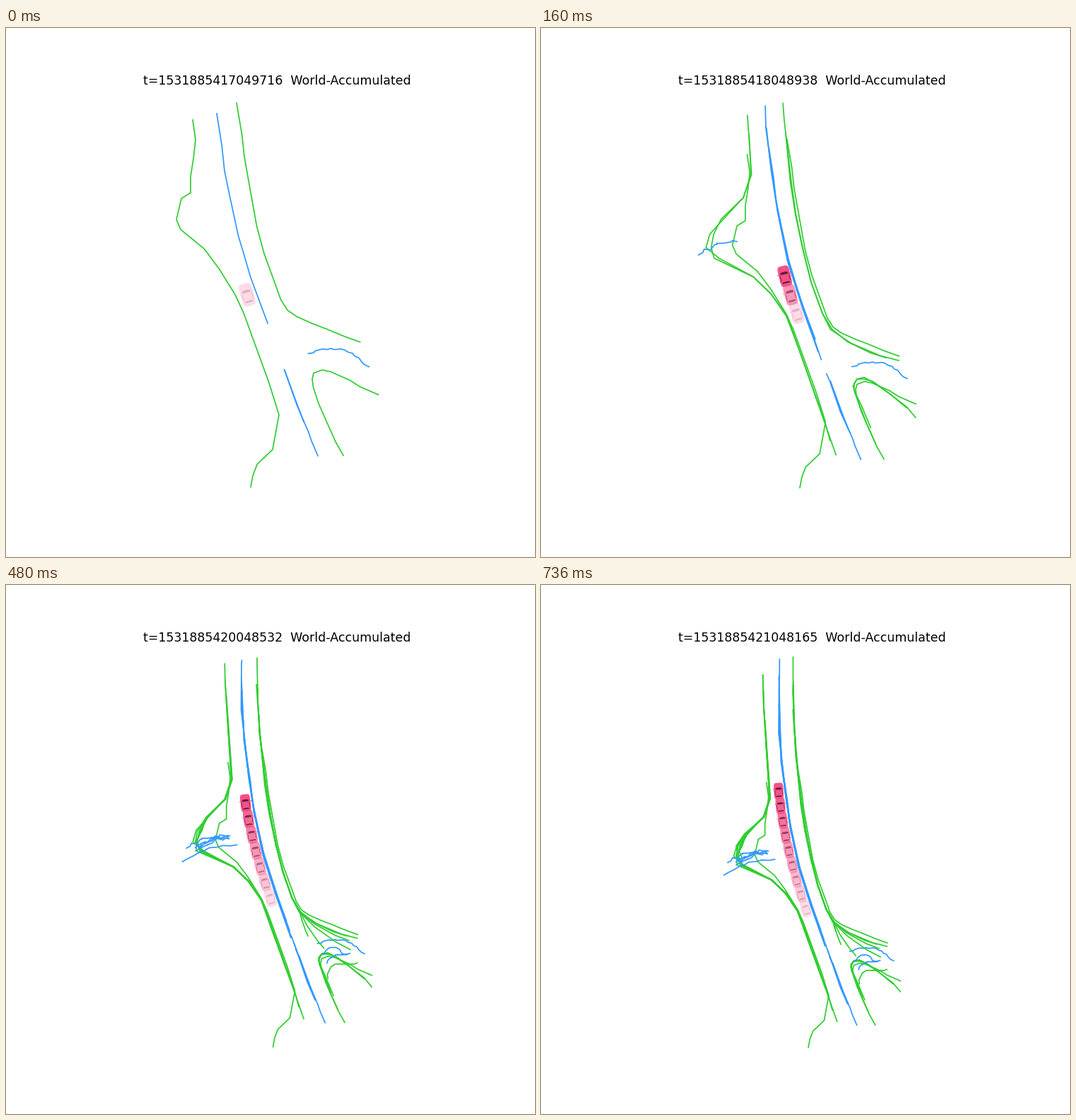
Write a matplotlib script that moves like this. It is 748 px wide and 748 px high and loops after 800 ms.

```python
import numpy as np
import matplotlib.pyplot as plt
from matplotlib.animation import FuncAnimation

SIZE = 748
STEPS = 5
GREEN, BLUE = "#32cd32", "#3399ff"
PINK, GLASS = "#fa4f87", "#5c2340"
STAMPS = [1531885417049716, 1531885418048938, 1531885419048128,
          1531885420048532, 1531885421048165]

# The view zooms out as the map grows: one fixed point and a scale per step.
ANCHOR = np.array([(346, 649), (366, 650), (367.5, 651.5), (377.5, 653), (378, 654)])
SCALE = [1, 0.9075, 0.832, 0.7745, 0.7215]
LAST = STEPS - 1

rng = np.random.default_rng(4)
lines = []


def change_view(points, old, new):
    return ANCHOR[new] + SCALE[new] / SCALE[old] * (points - ANCHOR[old])


def line(step, color, points, view=LAST):
    """Add a polyline, given in one view, that appears at a step."""
    lines.append((step, color, change_view(np.array(points, float), view, LAST)))


def scan(step, color, lane, top, bottom, bulge=0, tail=()):
    """Add one noisy sighting of a lane between two heights."""
    x, y = np.array(lane, float).T
    ys = np.array([top, *y[(y > top) & (y < bottom)], bottom])
    noise = 0.5 + bulge * np.exp(-((ys - 375) / 28) ** 2)
    xs = np.interp(ys, y, x) + rng.normal(0, 1, len(ys)) * noise
    line(step, color, [*zip(xs, ys), *tail])


def squiggle(step, path, view=LAST, count=15, rough=1.3):
    path = np.array(path, float)
    t = np.linspace(0, len(path) - 1, count)
    points = np.column_stack([np.interp(t, range(len(path)), c) for c in path.T])
    line(step, BLUE, points + rng.normal(0, rough, points.shape), view)


def fan(tip):
    """Side road leaving the right edge, sagging on its way to the tip."""
    t = np.array([0.3, 0.72, 1])
    sag = np.array([5, 4, 0]) * np.hypot(tip[0] - 413, tip[1] - 476) / 80
    return zip(413 + t * (tip[0] - 413), 476 + t * (tip[1] - 476) + sag)


# First scan, in the first view
line(0, GREEN, [(264, 130), (268, 158), (265, 185), (261, 210), (261, 233), (248, 241),
                (241, 271), (247, 285), (280, 312), (301, 340), (324, 377), (336, 403),
                (372, 502), (386, 547), (377, 596), (355, 617), (349, 633), (346, 649)], 0)
line(0, GREEN, [(326, 106), (333.5, 150), (337, 182), (343, 216), (354.5, 280), (365, 319),
                (381, 363), (388.5, 384), (398, 399), (411, 408), (432, 417.5),
                (453, 425.5), (477, 435.5), (500.5, 444)], 0)
line(0, GREEN, [(477, 604.5), (466, 585), (453, 556), (442, 531), (434.5, 508), (433, 496),
                (435, 488), (447, 483.5), (459, 486), (486, 498), (500, 507),
                (526.5, 518.5)], 0)
line(0, BLUE, [(298, 121), (305, 165), (309, 202), (316, 236), (328.5, 294), (334, 312),
               (346, 353), (370, 417.5)], 0)
line(0, BLUE, [(393.5, 483), (412, 535), (428, 572), (432, 584), (441, 605)], 0)
line(0, BLUE, [(394, 484), (409, 525), (421, 557)], 0)
squiggle(0, [(428, 460.5), (446, 454), (463, 452), (480, 456), (496, 467), (513, 478)], 0, 18, 1)

# Lanes in the last view, from top to bottom
LEFT = [(312.5, 102), (315, 170), (319, 234), (323.5, 302), (315, 328), (290, 352),
        (279, 369), (276, 384), (283, 396), (326, 417), (346, 436), (363, 461),
        (377, 498), (406, 581), (417.5, 617)]
RIGHT = [(356, 102), (356.5, 150), (358, 202), (360.5, 240), (368, 309), (374, 347),
         (382, 387), (391, 424), (403, 458), (413, 476)]
CENTER = [(337, 102), (336.5, 150), (337.5, 210), (340, 250), (346, 297), (353, 344),
          (365, 400), (382, 453), (402, 510)]
LOWER = [(402, 508), (412, 535), (424, 569), (437, 600), (446, 621)]
HOOK = np.array([(463, 604), (454, 584), (445, 561), (439, 545), (439, 537), (442, 532),
                 (450, 530), (458, 534), (477, 547), (498, 563), (508, 575)], float)
TIPS = [(489, 511), (475, 508), (480, 526), (478, 514), (424, 508), (445, 524),
        (417, 490), (414, 478)]

# Every later step sees each lane twice, reaching further up each time.
for step in range(1, STEPS):
    rise = 40 * (step - 1)
    for second in (0, 1):
        i = 2 * (step - 1) + second
        scan(step, GREEN, LEFT, max(257 - 21.5 * i, 127), 617 - 16 * i, bulge=2.5)
        scan(step, GREEN, RIGHT, 222 - rise + 35 * second, 476, tail=fan(TIPS[i]))
        scan(step, BLUE, CENTER, 225 - rise + 24 * second, 510 - 9 * second)
    if step < LAST:
        scan(step, BLUE, LOWER, 526 - 9 * (step - 1), 592)

# Side road
line(1, GREEN, HOOK)
line(1, GREEN, HOOK[1:10] + [(1, 1)] + rng.normal(0, 1, (9, 2)))
line(2, GREEN, HOOK[1:9] + rng.normal(0, 1, (8, 2)))
line(2, GREEN, [(450.4, 564), (449.5, 559), (454, 549), (460, 545), (485, 545), (489, 543.5)])
squiggle(2, [(443, 533), (450, 524), (461, 523), (471, 532), (479, 531)], count=11, rough=0.7)
squiggle(2, [(448, 543), (453, 537), (461, 534), (476, 532)], count=7, rough=0.7)

# Stop line beside the bulge
STOP = np.array([(321, 378), (304, 378), (292, 385), (278, 392)])
for step, dx, dy in [(1, -13, 0), (2, 0, 0), (2, -2, -1), (3, 0, 1), (3, -1, 3)]:
    squiggle(step, STOP + (dx, dy), count=11)
squiggle(3, [(330, 388), (303, 390), (280, 398), (259, 410)], count=10, rough=0.7)

# Car seen from above: x to the right, y forward
turn = np.linspace(0, 2 * np.pi, 60)
round_off = lambda v: np.sign(v) * np.abs(v) ** 0.4
BODY = np.column_stack([9.2 * round_off(np.cos(turn)), 16.2 * round_off(np.sin(turn))])
SIDE = np.array([(7.4, 4), (6.5, 1), (6.5, -6), (7.4, -9.5)])
MIRROR = np.array([(9, 4.5), (11.6, 3.6), (11, 2.6), (9, 3)])
FRONT = np.array([(-6.6, 5.4), (-3, 6.8), (3, 6.8), (6.6, 5.4), (5.2, 2.8), (-5.2, 2.8)])
REAR = np.array([(-5, -8.8), (5, -8.8), (6.3, -11.2), (-6.3, -11.2)])
FLIP = np.array([-1, 1])
PARTS = [(MIRROR, PINK), (MIRROR * FLIP, PINK), (BODY, PINK), (FRONT, GLASS),
         (REAR, GLASS), (SIDE, GLASS), (SIDE * FLIP, GLASS)]

fig = plt.figure(figsize=(SIZE / 100, SIZE / 100), dpi=100, facecolor="white")
ax = fig.add_axes([0, 0, 1, 1])


def draw_car(i, step, alpha):
    """Draw the i-th pose on the gently straightening path."""
    place = np.array([374.4 - 7.3 * i + 0.3125 * i * i, 457.8 - 20.8 * i])
    tilt = np.radians(16.5 - 1.6 * i)
    c, s = np.cos(tilt), np.sin(tilt)
    center = change_view(place, LAST, step)
    for shape, color in PARTS:
        outline = center + SCALE[step] * shape @ np.array([(c, -s), (-s, -c)])
        ax.fill(*outline.T, color=color, alpha=alpha, lw=0, zorder=3)


def draw(step):
    ax.clear()
    ax.set(xlim=(0, SIZE), ylim=(SIZE, 0))
    ax.axis("off")
    ax.text(383, 80, f"t={STAMPS[step]}  World-Accumulated", ha="center",
            va="baseline", family="DejaVu Sans", size=12.5)
    for born, color, points in lines:
        if born <= step:
            ax.plot(*change_view(points, LAST, step).T, color=color, lw=1.25)
    for i, alpha in enumerate(np.linspace(0.2, 1, 2 * step + 1)):
        draw_car(i, step, alpha)
    return []


anim = FuncAnimation(fig, draw, frames=STEPS, interval=160, init_func=lambda: draw(0),
                     repeat=True, repeat_delay=0)
plt.show()
```
